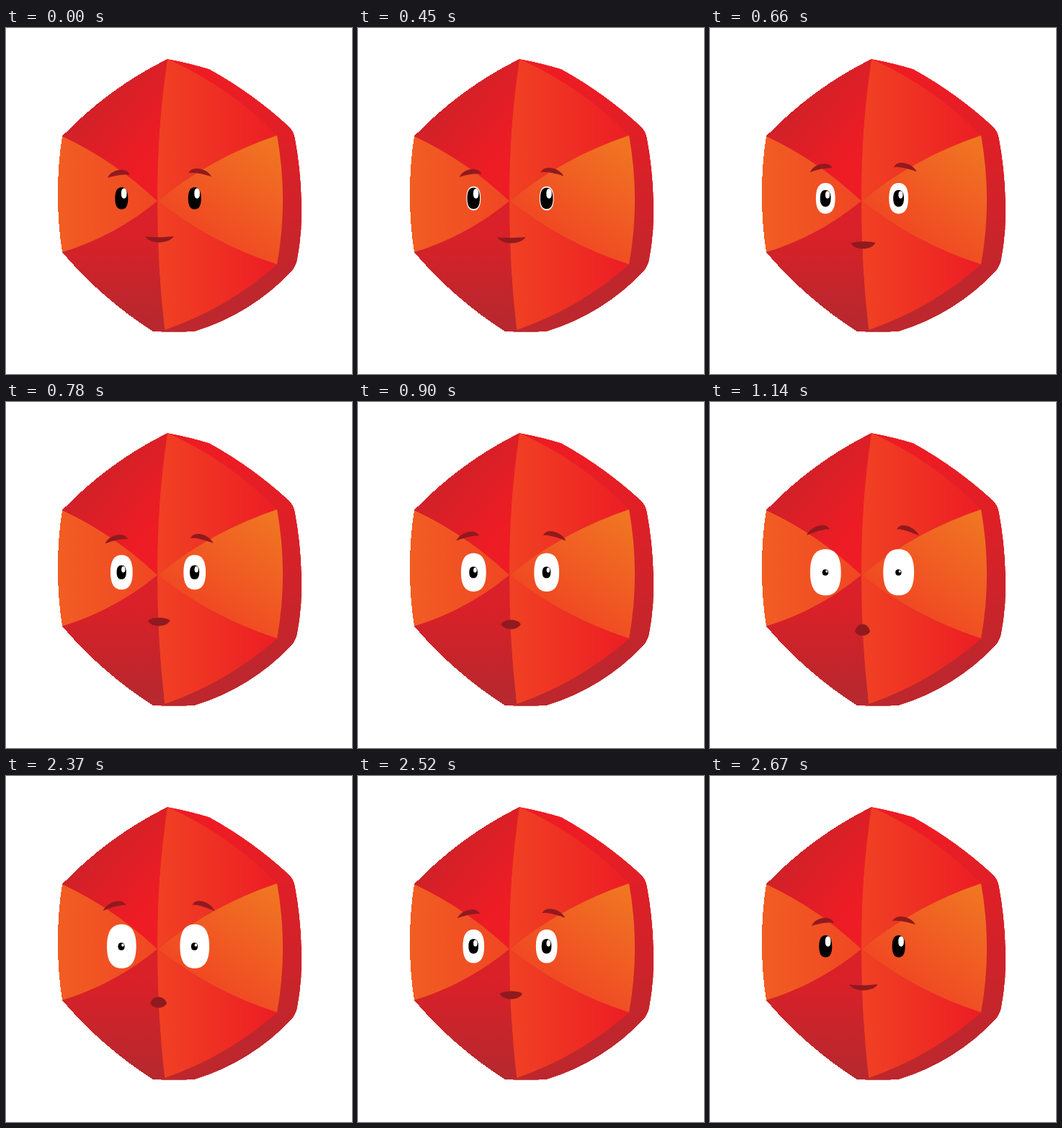
Animation, 480 px wide and 480 px high, one loop 2700 ms. Source, as an HTML page:

```html
<!DOCTYPE html>
<html>
<head>
<meta charset="utf-8">
<title>Surprised gem</title>
<style>
  html, body { margin: 0; width: 100%; height: 100%; overflow: hidden; background: #fff; }
  svg { display: block; width: 100vw; height: 100vh; }
</style>
</head>
<body>
<svg viewBox="0 0 480 480">
  <g id="gem"></g>
  <g fill="#901a1f"><path id="browL"/><path id="browR"/><path id="mouth"/></g>
  <g id="eye"><path id="white" fill="#fff"/><path id="pupil"/><path id="glint" fill="#fff"/></g>
  <use href="#eye" x="101.4"/>
</svg>
<script>
const $ = id => document.getElementById(id);
const LOOP = 2700, STEP = 30;

// Curve from a to b that bows out to the left of its direction
function arc([ax, ay], [bx, by], bend) {
  const cx = (ax + bx) / 2 + bend * (by - ay);
  const cy = (ay + by) / 2 - bend * (bx - ax);
  return `Q${cx},${cy} ${bx},${by}`;
}

const ring = (list, i) => list[(i + 1) % list.length];

// Outline, clockwise: x, y, bend of the side that follows
const hull = [
  [224, 43, .03], [282, 57, .06], [393, 137, .15], [401, 153, .04],
  [410, 238, .06], [404, 322, .12], [396, 338, .13], [262, 421, .03],
  [204, 421, .075], [78, 311, .04], [72, 230, .04], [78, 150, .087]
];

// Facets, clockwise: corner, bend of its spoke, bend of the rim, gradient colours and axis
const centre = [210, 240];
const facets = [
  { at: [224, 43], spoke: .04, rim: .095, fill: ["#f04123", "#ed1f24"], axis: [212, 0, 365, 0] },
  { at: [376, 149], spoke: .09, rim: .09, fill: ["#f07522", "#f04823"], axis: [365, 155, 275, 290] },
  { at: [376, 328], spoke: -.09, rim: .1, fill: ["#f04123", "#ed1f24"], axis: [212, 0, 365, 0] },
  { at: [220, 419], spoke: -.03, rim: .5, fill: ["#da2028", "#b8282e"], axis: [0, 285, 0, 405] },
  { at: [78, 311], spoke: .1, rim: .3, fill: ["#f15d23", "#f04723"], axis: [75, 0, 205, 0] },
  { at: [78, 150], spoke: -.08, rim: .5, fill: ["#d12128", "#ee1c24"], axis: [115, 110, 197, 180] }
];

function gradient(id, [from, to], [x1, y1, x2, y2]) {
  return `<linearGradient id="${id}" gradientUnits="userSpaceOnUse" x1="${x1}" y1="${y1}" x2="${x2}" y2="${y2}">` +
    `<stop stop-color="${from}"/><stop offset="1" stop-color="${to}"/></linearGradient>`;
}

function facet(f, i) {
  const next = ring(facets, i);
  const d = `M${centre}` + arc(centre, f.at, f.spoke) + arc(f.at, next.at, f.rim) +
    arc(next.at, centre, -next.spoke);
  return gradient("facet" + i, f.fill, f.axis) + `<path fill="url(#facet${i})" d="${d}Z"/>`;
}

// The white surround trims the gem to its hard-edged outline
const outline = "M224,43" + hull.map((p, i) => arc(p, ring(hull, i), p[2])).join("");
$("gem").innerHTML =
  gradient("side", ["#ed1c24", "#bd272d"], [330, 70, 350, 370]) +
  `<path fill="url(#side)" d="${outline}Z"/>` + facets.map(facet).join("") +
  `<path fill="#fff" fill-rule="evenodd" shape-rendering="crispEdges" d="M0,0H480V480H0Z${outline}Z"/>`;

// Calm and surprised pose of each lens: both ends, then sag of its upper and lower edge
const lenses = {
  browL: [[141, 208, 172, 204, -12, -2.5], [134, 185, 166, 177, -12, -2.5]],
  browR: [[253, 201.5, 285, 206.5, -11.5, -2.5], [259, 177, 290, 185.5, -12, -2.5]],
  mouth: [[193, 289, 233, 288.5, 2, 11.5], [201, 318, 222, 318, -13, 8]]
};

// The same for each blob: centre, half width, half height
const blobs = {
  white: [[160.3, 236.3, 9.4, 16], [160.3, 236.3, 21.4, 32]],
  pupil: [[160.3, 236.2, 9, 15.3], [160, 236.5, 4.2, 4.2]],
  glint: [[163.7, 229.5, 3.8, 7], [161.8, 235, 1.5, 1.6]]
};

function lens([x1, y1, x2, y2, up, down]) {
  const inset = (x2 - x1) * .15, a = x1 + inset, b = x2 - inset;
  return `M${x1},${y1} C${a},${y1 + up} ${b},${y2 + up} ${x2},${y2}` +
    ` C${b},${y2 + down} ${a},${y1 + down} ${x1},${y1}Z`;
}

function blob([x, y, w, h]) {
  const a = w * .67, b = h * .67;
  return `M${x - w},${y} C${x - w},${y - b} ${x - a},${y - h} ${x},${y - h}` +
    ` S${x + w},${y - b} ${x + w},${y} S${x + a},${y + h} ${x},${y + h}` +
    ` S${x - w},${y + b} ${x - w},${y}Z`;
}

const mix = ([a, b], p) => a.map((v, i) => v + (b[i] - v) * p);
const clamp = v => Math.min(1, Math.max(0, v));

// Rises over 24 steps, holds, then falls over 11
function surprise(t) {
  const n = Math.floor(t / STEP);
  return Math.min(clamp((n - 14) / 24), clamp((89 - n) / 11));
}

function draw(t) {
  const p = surprise(t);
  for (const id in lenses) $(id).setAttribute("d", lens(mix(lenses[id], p)));
  for (const id in blobs) $(id).setAttribute("d", blob(mix(blobs[id], p)));
  $("white").setAttribute("visibility", p > 0 ? "visible" : "hidden");
}

const start = performance.now();
function tick() {
  draw((performance.now() - start) % LOOP);
  requestAnimationFrame(tick);
}
tick();
</script>
</body>
</html>
```
